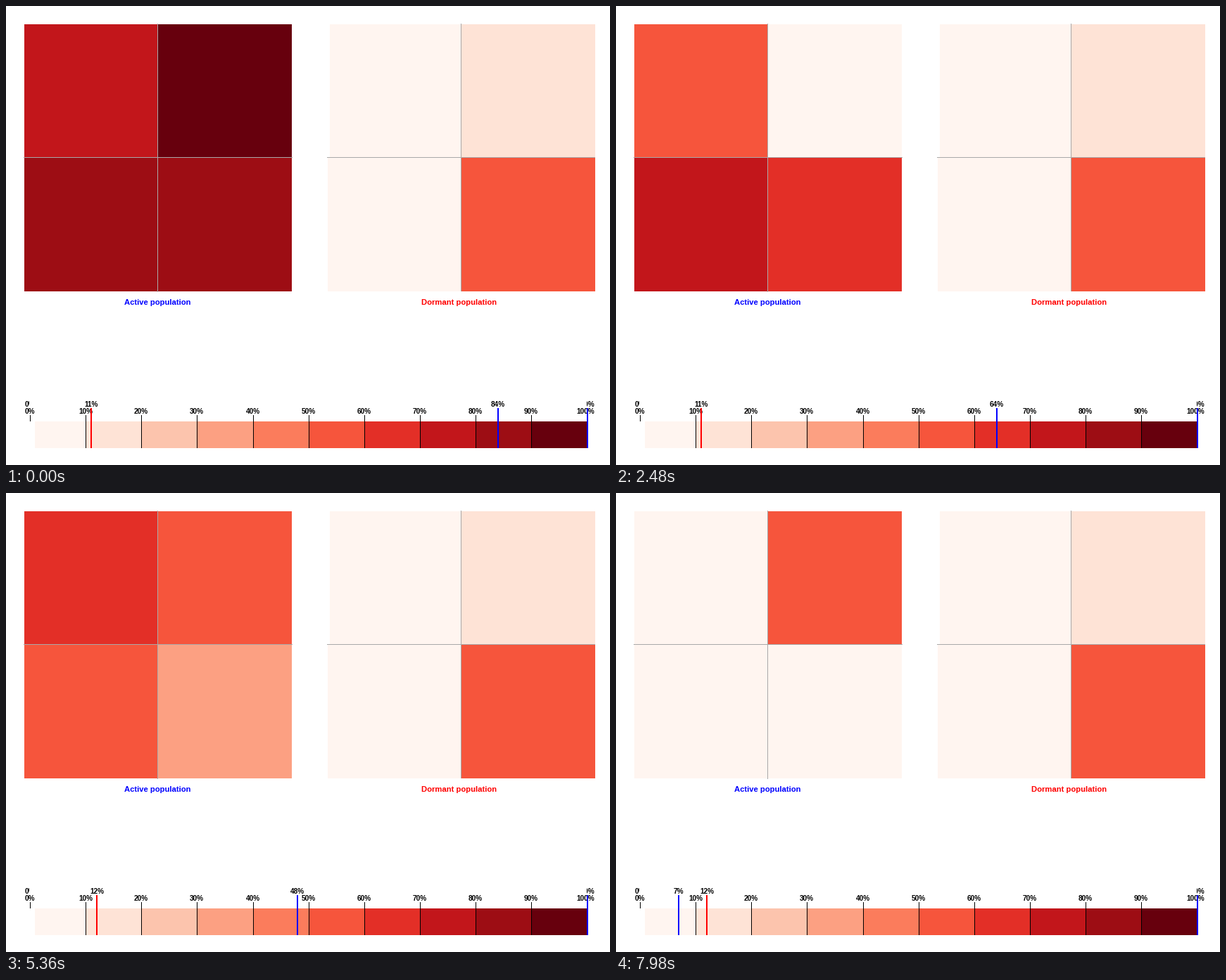
A matplotlib script that plays this animation: 858 by 653 pixels, repeating every 8 s.

```python
import numpy as np
import matplotlib
import matplotlib.pyplot as plt
from matplotlib.animation import FuncAnimation
from matplotlib.patches import Rectangle

W, H, DPI = 858, 653, 64
STEP, LOOP = 20, 8000

REDS = matplotlib.colormaps["Reds"](np.linspace(0, 1, 10))
GRID = "#a9a9a9"

# Population levels in percent at a few moments (ms)
TIMES = np.array([0, 1800, 3280, 4300, 5360, 6220, 7980])
MEAN = [84, 72, 54, 22, 48, 34, 7]
TOP_LEFT = [76, 66, 45, 15, 63, 53, 5]
LOW_LEFT = [88, 82, 65, 26, 55, 43, 7]
LOW_RIGHT = [84, 73, 54, 23, 37, 26, 5]
TOP_RIGHT = [95, 5, 5, 5, 55, 5, 55]  # tiny sample: jumps, never drifts
DORMANT_RISE = 2540

plt.rcParams["font.family"] = "Liberation Sans"
fig = plt.figure(figsize=(W / DPI, H / DPI), dpi=DPI, facecolor="white")
ax = fig.add_axes([0, 0, 1, 1])
ax.set_xlim(0, W)
ax.set_ylim(H, 0)
ax.axis("off")


def box(x0, y0, x1, y1, color, z=1):
    patch = Rectangle((x0, y0), x1 - x0, y1 - y0, facecolor=color,
                      edgecolor="none", linewidth=0, antialiased=False, zorder=z)
    return ax.add_patch(patch)


def label(x, y, text, px=10, color="black", z=5):
    return ax.text(x, y, text, fontsize=px * 72 / DPI, fontweight="bold",
                   color=color, ha="center", va="baseline", zorder=z)


def shade(level):
    return REDS[min(int(level // 10), 9)]


def scale_x(level):
    return int(round(34 + 7.915 * level))


# Active population: four cells of 190 px
active = [box(x, y, x + 190, y + 190, "white")
          for y in (26, 216) for x in (26, 216)]
box(25, 215, 407, 216, GRID, 2)
box(215, 25, 216, 407, GRID, 2)
label(215, 425, "Active population", 11.25, "blue")

# Dormant population
box(460, 26, 647, 216, shade(0))
box(647, 26, 837, 216, shade(10))
box(457, 216, 647, 406, shade(0))
box(647, 216, 837, 406, shade(50))
box(456, 215, 837, 216, GRID, 2)
box(646, 25, 647, 406, GRID, 2)
label(643.5, 425, "Dormant population", 11.25, "red")

# Colour scale
for k in range(10):
    left = 41 if k == 0 else scale_x(10 * k)
    box(left, 591, scale_x(10 * k + 10), 629, REDS[k])
for k in range(11):
    x = scale_x(10 * k)
    box(x - (k > 0) * 0, 582, x + 1, 591 if k == 0 else 629, "black", 2)
    label(823 if k == 10 else x, 580, f"{10 * k}%")

# Half-hidden end labels and the fixed marker at the right end
label(34, 570, "0%", z=3)
box(33, 561, 43, 571, "white", 4)
label(823, 570, "100%", z=3)
box(809, 561, 825, 571, "white", 4)
box(825, 572, 827, 629, "blue", 6)


def marker(color):
    return box(0, 572, 2, 629, color, 6), label(0, 570, "", z=7)


blue_mark = marker("blue")
red_mark = marker("red")


def place(mark, level):
    line, text = mark
    x = scale_x(level)
    line.set_x(x - 1)
    text.set_x(x)
    text.set_text(f"{level}%")


def update(i):
    t = i * STEP
    nearest = np.abs(TIMES - t).argmin()
    levels = (np.interp(t, TIMES, TOP_LEFT), TOP_RIGHT[nearest],
              np.interp(t, TIMES, LOW_LEFT), np.interp(t, TIMES, LOW_RIGHT))
    for cell, level in zip(active, levels):
        cell.set_facecolor(shade(level))
    place(blue_mark, int(round(np.interp(t, TIMES, MEAN))))
    place(red_mark, 11 if t < DORMANT_RISE else 12)
    return [*active, *blue_mark, *red_mark]


anim = FuncAnimation(fig, update, frames=LOOP // STEP, interval=STEP,
                     init_func=lambda: update(0), repeat=True, repeat_delay=0)
plt.show()
```
